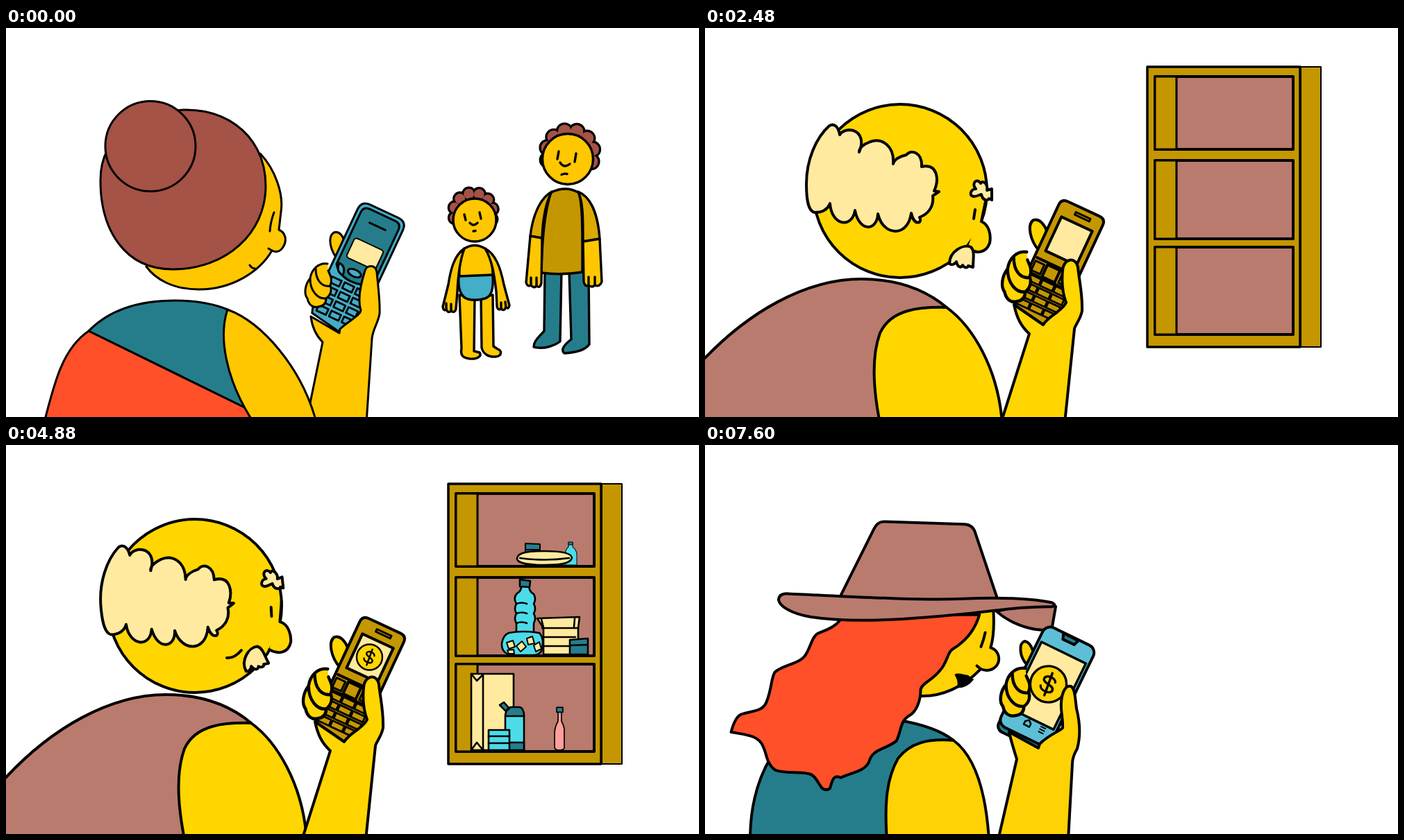
Recreate the animation shown at these times as an HTML page. Size 998x561 px, loop 8 s.

```html
<!DOCTYPE html>
<html lang="en">
<head>
<meta charset="utf-8">
<title>Phone money</title>
<style>
html, body { margin: 0; width: 100%; height: 100%; overflow: hidden; background: #fff; }
svg { display: block; width: 100vw; height: 100vh; stroke: #000; stroke-width: 3; stroke-linecap: round; stroke-linejoin: round; }
.thick { stroke-width: 4; }
.kid { stroke-width: 3.4; }
.item { stroke-width: 2.6; }
.none { fill: none; }
.black { fill: #000; }
.skin { fill: #ffc700; }
.gold { fill: #ffd600; }
.amber { fill: #ffd205; }
.brown { fill: #a55247; }
.red { fill: #ff5029; }
.teal { fill: #257d8c; }
.blue { fill: #44adc7; }
.sky { fill: #5cbfd6; }
.cyan { fill: #4ddbe9; }
.must { fill: #c49700; }
.sleeve { fill: #dba900; }
.rose { fill: #b97b6e; }
.pink { fill: #ff9f99; }
.cream { fill: #ffea9f; }
</style>
</head>
<body>
<svg viewBox="0 0 998 561" preserveAspectRatio="none">
<defs>
  <g id="coin">
    <circle r="18.5" stroke-width="2.4"/>
    <path class="none" stroke-width="2.4" transform="rotate(20)" d="M6-4C5-9-6-9-6-4C-6 1 6-1 6 4.500C6 9.500-6 9-7 4M0-12V12"/>
  </g>
  <g id="fingers">
    <path d="M463 340C450 338 440 348 438 361C430 371 429 384 434 390C436 400 443 404 450 402C458 401 461 396 461 390C469 384 469 376 467 371C471 362 466 355 464 350"/>
    <path class="none" d="M446 347C446 364 455 374 467 372M438 362C438 379 449 391 460 390"/>
  </g>
</defs>

<g id="s1">
  <path class="skin" d="M366 181C388 204 400 240 396 265L393 291C403 295 405 307 399 316C394 324 387 323 383 321C365 352 325 377 278 377C240 377 215 362 202 344"/>
  <path class="none" d="M383 321L378 318M386 266Q381 279 380 293"/>
  <path id="tick1" class="none" d="M351 342Q354 347 359 347"/>
  <path id="mouth1" class="black" stroke-width="1" d="M347 343C350 336 355 334 358 337L364 349C358 353 353 356 347 355C351 351 350 346 347 343Z"/>
  <path class="brown" d="M236 120C305 108 374 148 374 228C374 295 318 348 240 348C170 348 136 290 136 220C136 200 140 187 146 176Z"/>
  <circle class="brown" cx="208" cy="170.500" r="65"/>
  <path class="teal" d="M119 437C150 405 195 393 243 393C275 393 300 398 319 406L345 548Z"/>
  <path class="red" d="M56 565C70 510 82 462 119 437L345 548L354 565Z"/>
  <path class="skin" d="M480 336C466 322 463 301 472 295Q481 292 486 304Z"/>
  <g transform="translate(512 249) rotate(25)">
    <path class="blue" d="M14 0H58Q72 0 72 14V187L51 185L4 177L0 165V14Q0 0 14 0Z"/>
    <path class="teal" d="M6 16Q6 6 16 6H56Q66 6 66 16V98Q56 112 36 112Q16 112 6 98Z"/>
    <path class="none" d="M24 24H49"/>
    <rect class="cream" x="14" y="52" width="46" height="31" rx="4" stroke-width="2"/>
    <ellipse class="blue" cx="35" cy="99" rx="10" ry="5"/>
    <path class="blue" d="M9 95Q20 95 21 109Q9 108 9 95Z"/>
    <g id="keys1" class="blue"></g>
  </g>
  <use id="coin1" href="#coin" fill="#ffc700"/>
  <use href="#fingers" class="skin"/>
  <path class="skin" d="M517 350C519 342 532 340 534 352C536 375 539 395 538 412C536 425 528 435 527 448L519 570H432L456 453C448 445 441 433 439 416L480 440L481 434C495 421 510 415 511 407C507 395 509 375 517 350Z"/>
  <path class="skin" d="M319 406C370 425 425 490 446 565H354C316 505 306 445 319 406Z"/>

  <g id="kidA" class="kid">
    <g class="plain">
      <path class="teal" d="M776 350L775 437C765 448 760 452 760 460C775 464 790 458 798 452L800 350ZM811 350L814 449C802 458 799 465 804 469C820 468 835 464 840 456L839 350Z"/>
      <path class="must" d="M785 237Q806 227 824 237C831 250 830 300 830 352Q800 357 771 353C772 300 777 260 785 237Z"/>
      <path class="sleeve" d="M786 236C768 246 758 273 755 300L772 303C773 275 777 252 786 236ZM824 236C845 245 853 275 855 304L831 308C831 275 831 250 824 236Z"/>
      <path class="skin" d="M755 300L749 367Q751 374 756 371Q760 376 764 372Q769 376 771 368L772 303ZM831 308L832 366Q834 374 839 371Q844 375 848 371Q855 374 858 366L855 304Z"/>
      <path class="none" d="M756 360V371M764 360V372M839 359V371M848 359V371"/>
    </g>
    <g class="dressed">
      <path class="rose" d="M826 237C856 233 866 250 866 278V318L842 322Z"/>
      <path class="none" d="M836 243Q856 246 857 278V300M858 262L872 265"/>
      <path class="skin" d="M757 278L741 335C737 343 737 355 740 361Q745 362 746 355L747 366Q752 367 754 360Q758 366 760 360C763 352 761 345 761 338L776 285ZM856 280L868 338Q875 345 877 358Q872 363 868 355L868 363Q863 367 859 358Q858 366 852 364L851 356Q846 365 840 359Q840 350 849 340L838 291Z"/>
      <path class="none" d="M746 355L748 345M754 360L755 347M859 358L858 350M868 355L865 348"/>
      <path class="blue" d="M788 237C769 244 761 260 755 276L777 285L780 260ZM826 237C846 245 853 265 857 280L838 290L830 265Z"/>
      <path class="blue" d="M788 237Q806 229 826 237C835 260 837 295 836 319H775C777 290 778 260 788 237Z"/>
      <path class="blue" d="M794 235L800 247L806 239L813 246L818 235"/>
      <path class="none" d="M806 240V318M808 267H817"/>
      <path class="black" stroke-width="1" d="M819 237C816 255 823 277 835 285C838 265 833 247 827 237ZM785 238L793 236Q780 245 779 262Q774 252 785 238Z"/>
      <path class="teal" d="M775 318H836L839 442Q827 448 814 443L811 345H800L798 439Q786 444 774 438Z"/>
      <path class="rose" d="M774 438C764 448 759 452 760 460Q778 463 797 452L798 439Q786 444 774 438ZM814 443C802 458 799 463 804 469Q825 468 840 457L839 442Q827 448 814 443Z"/>
    </g>
    <g class="curls" data-c="812 181 33 11"></g>
    <circle class="skin" cx="809" cy="189" r="36.500"/>
    <path class="none" d="M796 178L794 189M821 181L819 193M798 194Q803 203 812 196"/>
    <path class="none plain" d="M800 211.500Q804 209.500 808 210.500"/>
    <path class="none dressed" d="M790 204Q803 213 816 206"/>
  </g>

  <g id="kidB" class="kid">
    <g class="plain">
      <path class="skin" d="M653 385L656 462C654 472 658 476 668 477C681 478 685 472 682 468L674 466L675 388ZM684 388L685 461C687 470 695 475 705 474C715 473 714 465 708 463L702 459L701 385Z"/>
      <path class="skin" d="M660 318Q675 309 690 318C700 330 701 345 701 357L653 359C652 340 655 330 660 318Z"/>
      <path class="blue" d="M652 358L701 356C702 375 700 387 690 390Q677 394 665 391C653 387 651 372 652 358Z"/>
      <path class="skin" d="M660 318C645 328 640 350 637 370L629 402Q630 409 634 406Q637 412 641 408Q646 412 648 405L650 380C651 355 654 335 660 318ZM690 318C705 326 712 345 717 370L725 400Q724 406 720 403Q717 409 713 405Q709 408 707 402L706 380C703 355 700 335 690 318Z"/>
      <path class="none" d="M634 406V397M641 408V398M720 403L719 395M713 405V396"/>
    </g>
    <g class="dressed">
      <path class="rose" d="M658 315C640 314 633 326 634 345V387L656 390Z"/>
      <path class="skin" d="M635 349L617 378Q609 391 611 401Q616 404 619 397L620 405Q625 409 628 401Q632 405 634 398L633 391Q640 393 642 386Q638 380 632 380L648 358ZM717 347L730 376Q738 386 737 394Q733 398 729 392L729 398Q724 403 720 394Q716 400 712 394Q706 390 710 379L704 360Z"/>
      <path class="none" d="M619 397L621 390M628 401V392M720 394L719 388M729 392L726 386"/>
      <path class="blue" d="M663 316C648 322 639 335 633 349L649 359L660 338ZM691 316C706 322 713 335 719 347L705 361L694 340Z"/>
      <path class="blue" d="M662 316Q676 310 692 316C700 330 702 345 702 362H654C654 345 655 330 662 316Z"/>
      <path class="blue" d="M666 315L672 324L677 318L683 324L688 315"/>
      <path class="none" d="M677 318V361"/>
      <path class="none" stroke-width="5" d="M663 318Q655 332 656 351M692 318Q698 328 698 342"/>
      <path class="teal" d="M653 361H702L701 458Q693 463 686 459L684 382H675L674 462Q664 466 656 460Z"/>
      <path class="rose" d="M656 461C654 472 658 476 668 477C681 478 685 472 682 468L674 462Q664 466 656 461ZM686 459C687 470 695 475 705 474C715 473 714 465 708 463L701 458Q693 463 686 459Z"/>
    </g>
    <g class="curls" data-c="673 266 27.500 9"></g>
    <circle class="skin" cx="675" cy="277" r="31"/>
    <path class="none" d="M660 269L662 277M682 266L684 275M668 281Q673 287 679 281"/>
    <path class="none plain" d="M673 293L676 292.500"/>
    <path class="black dressed" stroke-width="1" d="M666 291Q677 293 686 289Q686 299 677 299Q669 299 666 291Z"/>
  </g>
</g>

<g id="s2" class="thick">
  <g id="body2">
    <path class="rose" d="M-20 498C60 405 150 362 225 362C275 362 315 375 348 403L258 570H-20Z"/>
    <path class="gold" d="M348 403C385 430 422 490 428 570H252C240 510 241 470 252 440C268 405 310 402 348 403Z"/>
  </g>
  <circle id="head2" class="gold" cx="281" cy="235" r="125"/>
  <path id="hair2" class="cream" d="M194 154C192 142 186 137 179 141C160 158 146 190 146 225C146 250 149 264 158 266C170 266 177 261 180 253C182 285 212 290 216 263C222 295 248 293 249 268C256 300 292 303 297 267C301 286 314 282 309 273C322 268 330 257 328 242L337 236L330 235C337 220 336 195 312 200C313 180 298 174 290 183C280 185 272 190 271 196C273 170 255 158 238 164C228 168 222 172 222 179C230 160 222 147 207 147C200 148 196 150 194 154Z"/>
  <path id="nose2" class="gold" d="M404 250L398 279C410 284 412 300 410 310C405 324 392 327 378 317"/>
  <path id="eye2" class="none" d="M389 262L387 275"/>
  <path id="brow2" class="cream" d="M397 224C391 215 383 225 390 232C383 232 379 242 387 243C392 243 396 240 398 240C400 250 408 249 409 246L413 248V232L406 234C408 226 400 218 397 224Z"/>
  <path id="smile2" class="none" d="M318 307Q329 308 339 296"/>
  <path id="tache2" class="cream" d="M383 316C372 311 352 322 352 340C356 343 360 340 362 337C364 346 369 346 371 342C374 347 379 346 379 343L386 345C386 333 389 322 383 316Z"/>

  <path class="gold" d="M482 322C467 306 464 283 473 277Q484 274 492 292Z"/>
  <g transform="translate(513.500 246) rotate(25)">
    <path class="must" d="M10 0H60Q70 0 70 10V178L52 176L4 168L0 160V10Q0 0 10 0Z"/>
    <rect class="must" x="27" y="9" width="23" height="4" stroke-width="3"/>
    <rect class="cream" x="11" y="24" width="49" height="54"/>
    <path class="none" d="M4 92H66M4 116H66"/>
    <rect class="must" x="22" y="95" width="20" height="19"/>
    <rect class="must" x="4" y="97" width="14" height="15" stroke-width="3"/>
    <rect class="must" x="47" y="97" width="14" height="15" stroke-width="3"/>
    <g id="keys2" class="must"></g>
  </g>
  <use id="coin2" href="#coin" fill="#ffd600"/>
  <use href="#fingers" class="gold" transform="translate(-46 -68) scale(1.1 1.150)"/>
  <path class="gold" d="M515 350C516 332 534 329 537 345C539 365 544 385 543 408C541 420 532 430 532 434L518 570H426L467 441C455 430 449 418 445 399L487 428C495 415 515 408 520 396C516 385 513 370 515 350Z"/>

  <rect class="must" x="858" y="56" width="29" height="404" stroke-width="2"/>
  <rect class="must" x="637" y="56" width="220" height="404" stroke-width="3.500"/>
  <g id="cells"></g>
  <g id="items" class="item">
    <g data-i="758 173 4656 400 1.7"><path class="teal" stroke-width="2" d="M748 142L769 143V173H748ZM748 151H769"/></g>
    <g data-i="813 173 4720 400 2.85"><path class="cyan" stroke-width="1" d="M810 141H816V147Q822 152 822 158V173H805V158Q805 152 810 147Z"/><path class="teal" stroke-width="1" d="M810 140H816V144H810Z"/></g>
    <g data-i="775 173 4560 320 1"><path class="cream" d="M736 163C738 154 755 153 775 153C800 153 815 156 815 163C812 172 795 173 775 173C750 173 735 170 736 163Z"/><path class="none" d="M740 163Q775 168 811 163"/></g>
    <g data-i="747 303 4400 320 1"><path class="cyan" d="M742 204H753Q754 212 760 215Q764 222 760 229Q764 236 760 243Q764 250 760 257V275H735V257Q731 250 735 243Q731 236 735 229Q730 220 736 214Q742 211 742 204Z"/><path class="teal" d="M740 194L755 196L754 205L740 204Z"/><path class="none" d="M735 229Q743 226 750 229M735 243Q743 240 750 243M735 257Q743 254 750 257"/></g>
    <g data-i="795 303 4480 320 1"><path class="cream" d="M765 250L826 248L824 264V302H774V264Z"/><path class="none" d="M772 264H824M774 277H820M774 290H818M771 251L774 263M819 250L818 262"/></g>
    <g data-i="825 302 4560 320 1"><path class="teal" d="M812 281L838 279V302H812ZM812 289L838 288"/></g>
    <g data-i="744 303 4480 400 1"><path class="cyan" d="M724 271Q744 267 768 271Q775 278 772 292Q772 302 760 303H728Q713 300 714 286Q716 274 724 271Z"/><path class="cream" stroke-width="2" d="M721 285L730 282L733 291L724 294ZM735 290L743 283L749 291L741 298ZM750 279L758 276L761 286L752 288ZM760 289L768 284L771 294L763 298ZM722 296L731 295L732 301H724Z"/></g>
    <g data-i="700 440 4400 320 1"><path class="cream" d="M670 330H731V440H670Z"/><path class="none" d="M687 331V439M670 330L678 340L687 331M670 440L678 429L687 440"/></g>
    <g data-i="733 440 4480 320 1"><path class="cyan" d="M719 391Q720 383 728 380H740Q746 383 746 391V440H719Z"/><path class="teal" d="M719 391Q720 378 728 378H740Q746 380 746 391ZM722 429H746V440H722ZM711 375L717 371L725 380L720 384Z"/></g>
    <g data-i="710 440 4560 320 1"><path class="cyan" d="M695 411H725V440H695Z"/><path class="none" d="M695 420H725M695 430H725"/></g>
    <g data-i="797 440 4636 400 1.5"><path class="pink" stroke-width="1.700" d="M795 384H800V398Q805 407 804 415V437Q803 440 797 440Q790 440 790 436V415Q790 407 795 398Z"/><path class="teal" stroke-width="1.700" d="M793 378H802V385H793Z"/></g>
  </g>
</g>

<g id="s3" class="thick">
  <path class="teal" d="M65 570C65 520 77 480 95 450L280 397C315 403 340 412 358 426L264 570Z"/>
  <path class="amber" d="M358 426C390 450 405 505 409 570H262C258 515 262 480 278 452C295 430 320 423 358 426Z"/>
  <g id="head3">
    <path class="amber" d="M395 222C399 245 400 262 397 278C408 280 412 290 410 299C406 310 395 313 386 310C365 337 335 357 300 358V300L372 225Z"/>
    <path class="none" d="M386 310L380 306M387 257Q386 268 383 278"/>
    <path id="tick3" class="none" stroke-width="3.500" d="M361 324Q364 329 370 330"/>
    <path id="mouth3" class="black" stroke-width="1" d="M350 322C355 318 362 322 368 321L377 326C372 335 363 340 355 340C357 332 354 328 350 322Z"/>
    <path class="red" d="M376 232C372 255 360 272 345 284C335 290 338 305 328 318C318 334 305 338 303 348C305 365 300 382 290 388C278 398 282 410 276 426C262 440 243 440 240 460C235 475 215 478 202 487C190 482 190 495 188 504Q182 509 176 504C168 495 164 486 154 486C140 484 125 490 107 486C93 478 93 465 86 454C78 438 60 440 38 438C40 425 44 414 50 411C65 404 80 404 84 390C90 370 87 352 92 345C105 332 128 330 134 314C140 300 140 288 148 283C160 277 175 270 180 255Z"/>
    <path class="rose" d="M400 225C430 246 474 250 482 239L484 209L440 210Z"/>
    <path class="rose" d="M172 232L212 125Q216 114 226 113L340 105Q352 104 357 114L404 217"/>
    <path class="rose" d="M98 231C180 226 280 222 350 212C400 204 450 201 478 204Q486 207 478 210C430 214 380 230 300 244C230 257 180 263 135 261C105 259 88 250 86 241Q86 232 98 231Z"/>
  </g>
  <path class="amber" d="M464 317C452 305 452 286 460 283Q469 284 473 300Z"/>
  <g transform="translate(491.500 258.400) rotate(26)">
    <rect class="teal" x="1" y="60" width="80" height="108" rx="10"/>
    <rect class="sky" width="81" height="160" rx="12"/>
    <path class="teal" d="M28 1H52L49 9H31Z"/>
    <rect class="cream" x="5" y="26" width="71" height="106" stroke-width="3.500"/>
    <path class="none" stroke-width="2.500" d="M34 144V139L38.500 135L43 139V144Z"/>
    <path class="none" stroke-width="2" d="M58 136H65M58 140H65M58 144H65"/>
  </g>
  <use id="coin3" href="#coin" fill="#ffd205"/>
  <use href="#fingers" class="amber" transform="translate(-57 -52) scale(1.120 1.100)"/>
  <path class="amber" d="M513 372C514 355 520 346 527 348C533 352 533 365 535 380C540 400 541 420 536 438C530 448 529 455 529 460L523 570H422L449 453C445 440 441 428 438 414L480 437L482 431C495 418 512 412 515 408C516 395 512 385 513 372Z"/>
</g>
</svg>
<script>
const $ = id => document.getElementById(id);
const all = sel => [...document.querySelectorAll(sel)];
const clamp = p => Math.max(0, Math.min(1, p));
const smooth = p => (p = clamp(p), p * p * (3 - 2 * p));
const easeOut = p => 1 - (1 - clamp(p)) ** 3;
const show = (el, on) => el.style.display = on ? '' : 'none';
const set = (el, value) => el.setAttribute('transform', value);

// scale about a point; hidden at zero
function grow(el, x, y, s) {
  show(el, s > 0.01);
  set(el, `translate(${x} ${y}) scale(${s}) translate(${-x} ${-y})`);
}

function placeCoin(id, x, y, s) {
  show($(id), s > 0.01);
  set($(id), `translate(${x} ${y}) scale(${s})`);
}

function shift(id, p, dx, dy, turn, cx, cy) {
  set($(id), `translate(${dx * p} ${dy * p}) rotate(${turn * p} ${cx} ${cy})`);
}

function keypad(id, x, y, dx, dy, w, h) {
  let out = '';
  for (let i = 0; i < 12; i++)
    out += `<rect x="${x + i % 3 * dx}" y="${y + (i / 3 | 0) * dy}" width="${w}" height="${h}" stroke-width="2.8"/>`;
  $(id).innerHTML = out;
}
keypad('keys1', 8, 117, 20, 15, 15, 9);
keypad('keys2', 4, 118, 21, 12.5, 19, 9);

// outlined circles, then their plain insides on top
for (const g of all('.curls')) {
  const [x, y, ring, r] = g.dataset.c.split(' ').map(Number);
  const row = (radius, extra) => {
    let out = '';
    for (let i = 0; i < 8; i++) {
      const a = Math.PI * (0.91 + i * 0.172);
      out += `<circle class="brown" cx="${x + ring * Math.cos(a)}" cy="${y + ring * Math.sin(a)}" r="${radius}" ${extra}/>`;
    }
    return out;
  };
  g.innerHTML = row(r, '') + row(r - 1.7, 'stroke="none"');
}

$('cells').innerHTML = [[70, 105], [191, 113], [316, 126]].map(([y, h]) =>
  `<rect class="rose" x="648" y="${y}" width="199" height="${h}"/>
   <rect class="must" x="648" y="${y}" width="31" height="${h}" stroke-width="3"/>`).join('');

const items = [...$('items').children].map(el => [el, ...el.dataset.i.split(' ').map(Number)]);

function draw(t) {
  show($('s1'), t < 2480);
  show($('s2'), t >= 2480 && t < 6320);
  show($('s3'), t >= 6320);

  if (t < 2480) {
    show($('tick1'), t < 400);
    grow($('mouth1'), 357, 347, smooth((t - 320) / 400));
    placeCoin('coin1', 517, 326, 0.73 * smooth((t - 320) / 480));
    const dressed = t >= 1280;
    all('.plain').forEach(el => show(el, !dressed));
    all('.dressed').forEach(el => show(el, dressed));
    const s = dressed ? 0.92 + 0.08 * easeOut((t - 1200) / 560)
                      : 1 + 0.063 * smooth((t - 720) / 480);
    grow($('kidA'), 803, 304, s);
    grow($('kidB'), 677, 356, s);
  } else if (t < 6320) {
    const c = easeOut((t - 2960) / 400);
    placeCoin('coin2', 516 + 7.5 * c, 298 + 8 * c, c);
    const p = smooth((t - 4400) / 480);
    shift('body2', p, 5, -2, 0, 0, 0);
    shift('head2', p, -9, -3, 0, 0, 0);
    shift('hair2', p, -9, -3, -5, 281, 235);
    shift('nose2', p, -1, -24, -7, 396, 300);
    shift('eye2', p, -6, -28, -12, 388, 268);
    shift('brow2', p, -15, -40, -6, 397, 235);
    shift('tache2', p, -13, -21, -28, 370, 330);
    show($('smile2'), p > 0.6);
    for (const [el, x, y, start, time, size] of items)
      grow(el, x, y, t < 4480 ? 0 : size * smooth((t - start) / time));
  } else {
    const p = smooth((t - 7040) / 560);
    set($('head3'), `rotate(${6 * p} 267 422)`);
    show($('tick3'), t < 7120);
    grow($('mouth3'), 364, 329, p);
    placeCoin('coin3', 494.5, 345, 1.41 * p);
  }
}

// drawn on a 12.5 fps step
function frame(now) {
  draw(Math.floor(now % 8000 / 80) * 80);
  requestAnimationFrame(frame);
}
draw(0);
requestAnimationFrame(frame);
</script>
</body>
</html>
```
